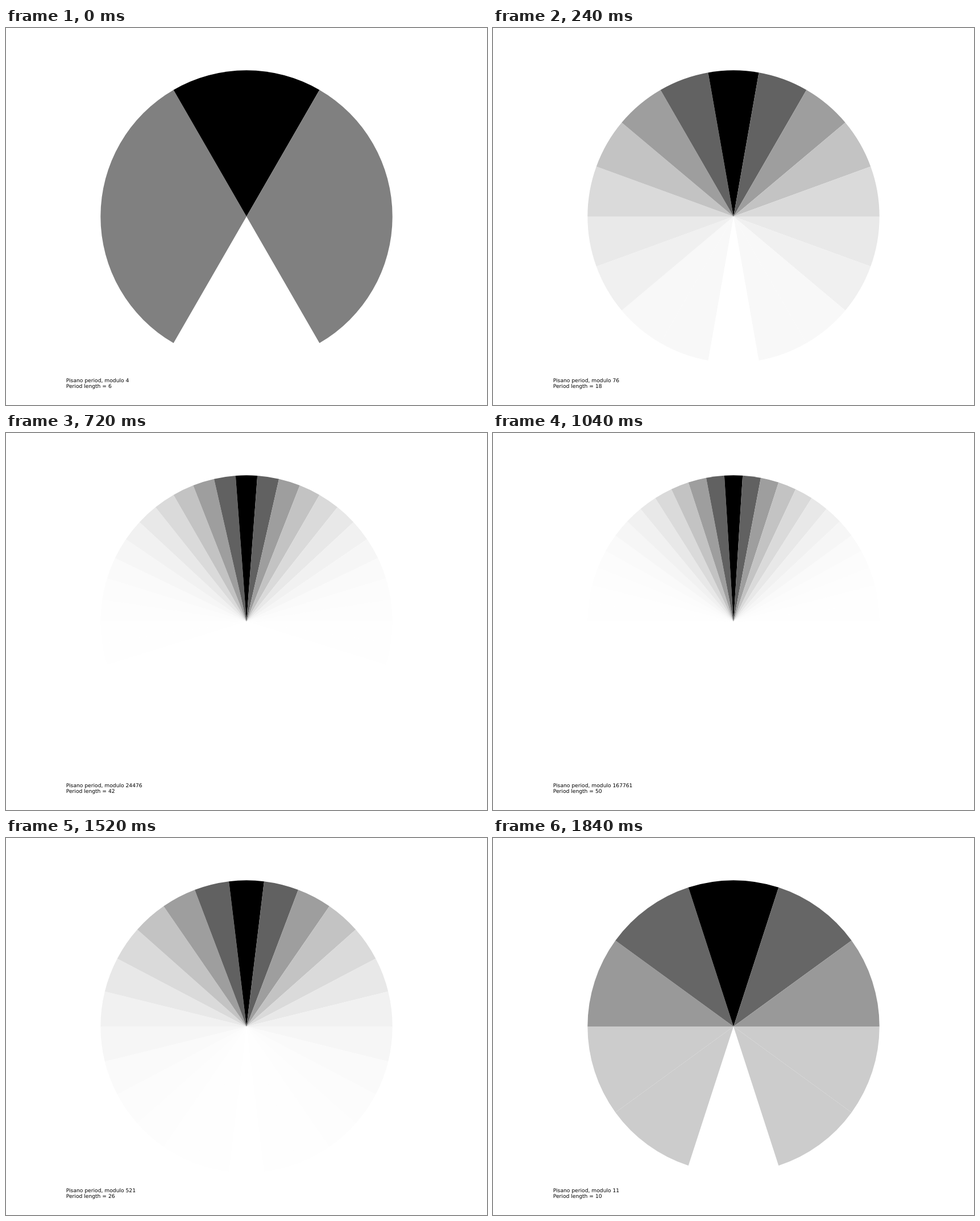
Recreate the animation shown at these times as an HTML page with a canvas. Size 846 by 662 pixels, loop 1920 ms.

```html
<!DOCTYPE html>
<html lang="en">
<head>
<meta charset="utf-8">
<title>Pisano periods</title>
<style>
  html, body { margin: 0; width: 100%; height: 100%; overflow: hidden; background: #fff; }
  canvas, svg { position: absolute; left: 0; top: 0; display: block; }
  text { font: 9.17px "DejaVu Sans", sans-serif; fill: #000; text-rendering: geometricPrecision; }
</style>
</head>
<body>
<canvas id="pie" width="846" height="662"></canvas>
<svg width="846" height="662">
  <text id="modulo" x="105.75" y="622"></text>
  <text id="period" x="105.75" y="632"></text>
</svg>
<script>
const ctx = document.getElementById('pie').getContext('2d');
const modulo = document.getElementById('modulo');
const period = document.getElementById('period');
const CX = 423, CY = 331, R = 256.7;
const STEP = 80, PEAK = 12;

// Additive sequence: Fibonacci from 0, 1 and Lucas from 2, 1.
function term(a, b, n) {
  while (n-- > 0) [a, b] = [b, a + b];
  return a;
}
const fib = n => term(0, 1, n);
const lucas = n => term(2, 1, n);

function sector(mid, width, shade) {
  ctx.fillStyle = `rgb(${shade},${shade},${shade})`;
  ctx.beginPath();
  ctx.moveTo(CX, CY);
  ctx.arc(CX, CY, R, mid - width / 2, mid + width / 2);
  ctx.fill();
}

// For odd n, the residues modulo lucas(n) have period 2n and mirror about fib(n).
function draw(n) {
  const width = Math.PI / n;
  const top = fib(n);
  ctx.clearRect(0, 0, 846, 662);
  for (let k = 0; k < 2 * n; k++) {
    const value = fib(Math.min(k, 2 * n - k));
    sector(Math.PI / 2 + k * width, width, Math.round(255 * (1 - value / top)));
  }
  modulo.textContent = `Pisano period, modulo ${lucas(n)}`;
  period.textContent = `Period length = ${2 * n}`;
}

let shown = 0;
function frame(now) {
  const i = Math.floor(Math.max(0, now - start) / STEP) % (2 * PEAK);
  const n = 3 + 2 * Math.min(i, 2 * PEAK - i);
  if (n !== shown) draw(shown = n);
  requestAnimationFrame(frame);
}

const start = performance.now();
frame(start);
</script>
</body>
</html>
```
